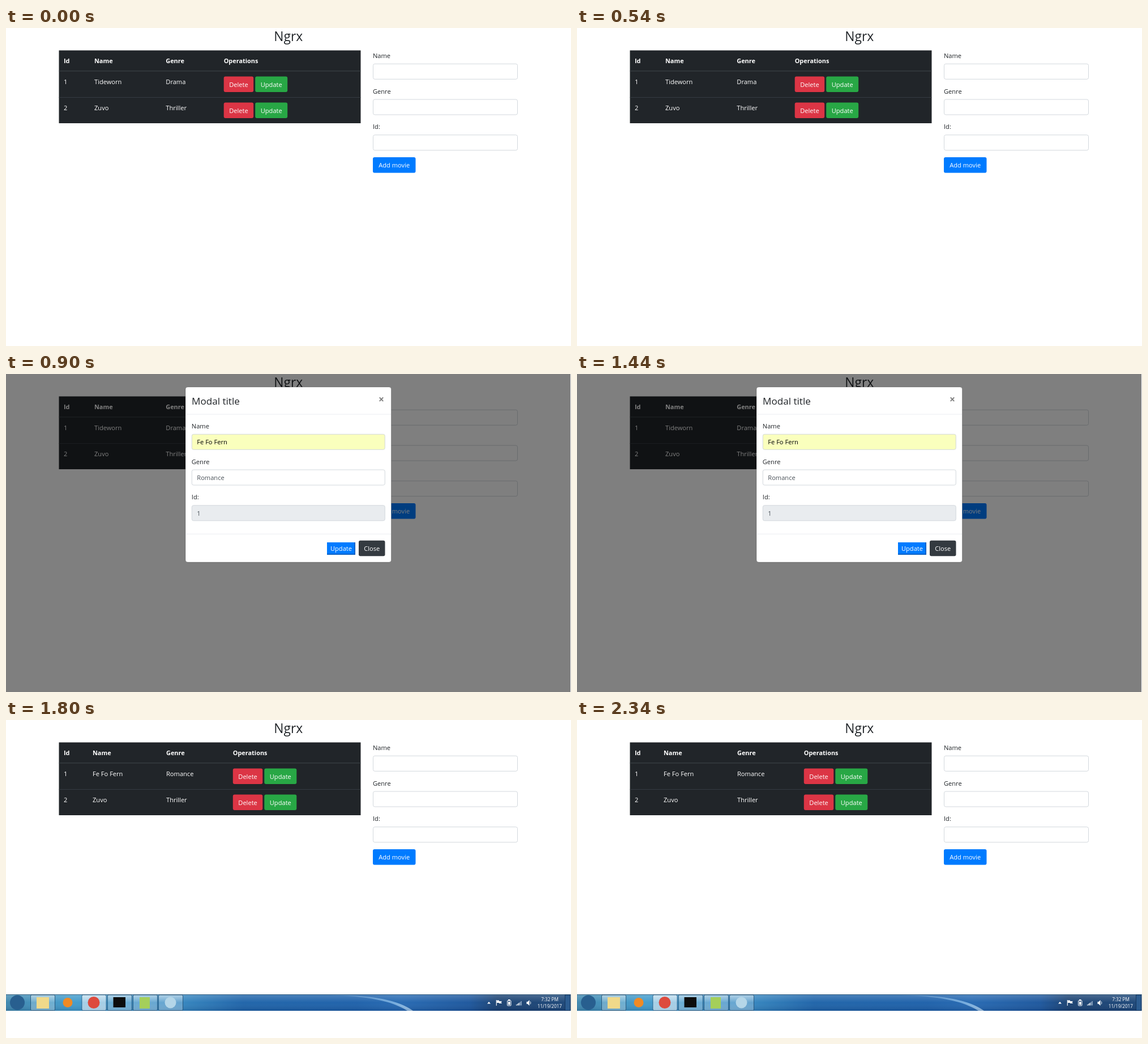
An HTML page for the animation above (2.7 s loop, 998 by 561 pixels).

```html
<!DOCTYPE html>
<html lang="en">
<head>
<meta charset="utf-8">
<title>Movie list</title>
<style>
  html, body { margin: 0; width: 100%; height: 100%; overflow: hidden; background: #fff; }
  svg { display: block; width: 998px; height: 561px; }
  text { font-family: "Open Sans", "Noto Sans", sans-serif; font-size: 11.1px; white-space: pre; }
</style>
</head>
<body>
<svg id="stage" viewBox="0 0 998 561" xmlns="http://www.w3.org/2000/svg">
  <defs>
    <linearGradient id="bar">
      <stop offset="0" stop-color="#3d86ad"/>
      <stop offset=".12" stop-color="#3f9acb"/>
      <stop offset=".3" stop-color="#3487c0"/>
      <stop offset=".42" stop-color="#1c62a8"/>
      <stop offset=".62" stop-color="#1b5fa9"/>
      <stop offset=".7" stop-color="#2367b1"/>
      <stop offset=".82" stop-color="#1a559c"/>
      <stop offset=".87" stop-color="#173f70"/>
      <stop offset="1" stop-color="#1a4577"/>
    </linearGradient>
    <linearGradient id="gloss" x2="0" y2="1">
      <stop offset="0" stop-color="#fff" stop-opacity=".22"/>
      <stop offset=".5" stop-color="#fff" stop-opacity=".03"/>
      <stop offset="1" stop-color="#002" stop-opacity=".14"/>
    </linearGradient>
    <linearGradient id="tile" x2="0" y2="1">
      <stop offset="0" stop-color="#fff" stop-opacity=".5"/>
      <stop offset=".5" stop-color="#fff" stop-opacity=".22"/>
      <stop offset="1" stop-color="#fff" stop-opacity=".3"/>
    </linearGradient>
    <linearGradient id="streak">
      <stop offset="0" stop-color="#9fd0f5" stop-opacity="0"/>
      <stop offset=".8" stop-color="#9fd0f5" stop-opacity=".65"/>
      <stop offset="1" stop-color="#c5e4fb" stop-opacity=".8"/>
    </linearGradient>
  </defs>
</svg>
<script>
const stage = document.getElementById('stage');
const HOLD = 900, LOOP = 2700;
const DARK = '#212529', GREY = '#495057', BLUE = '#007bff';

function add(parent, tag, attrs, content) {
  const el = document.createElementNS('http://www.w3.org/2000/svg', tag);
  for (const key in attrs) el.setAttribute(key, attrs[key]);
  if (content) el.textContent = content;
  parent.appendChild(el);
  return el;
}
const group = () => add(stage, 'g', {});
const box = (p, x, y, width, height, fill, more) =>
  add(p, 'rect', { x, y, width, height, fill, ...more });
const label = (p, x, y, content, fill = DARK, more) =>
  add(p, 'text', { x, y, fill, ...more }, content);
const path = (p, d, more) => add(p, 'path', { d, fill: 'none', ...more });
const middle = { 'text-anchor': 'middle' };

function button(p, x, y, w, content, fill) {
  box(p, x, y, w, 27.5, fill, { rx: 3 });
  label(p, x + w / 2, y + 18.2, content, '#fff', { ...middle, 'font-size': 11.2 });
}

function field(p, x, y, w, name, { value, fill = '#fff', ink = GREY } = {}) {
  label(p, x - .5, y - 10.5, name);
  box(p, x, y, w, 27, fill, { stroke: '#ced4da', 'stroke-width': .9, rx: 3 });
  if (value) label(p, x + 9, y + 18, value, ink);
}

function table(p, cols, rows) {
  box(p, 93.5, 39.5, 533, 128.5, DARK);
  box(p, 93.5, 75.4, 533, 1, '#40464b');
  box(p, 93.5, 122, 533, .9, '#383e44');
  ['Id', 'Name', 'Genre', 'Operations'].forEach((head, i) =>
    label(p, cols[i], 62.3, head, '#fff', { 'font-weight': 700, style: 'font-size:10.9px' }));
  rows.forEach((row, r) => {
    const y = 85.5 + r * 46;
    row.forEach((cell, i) => label(p, cols[i], y + 13.4, cell, '#fff'));
    button(p, cols[3], y, 52.5, 'Delete', '#dc3545');
    button(p, cols[3] + 55.5, y, 57, 'Update', '#28a745');
  });
}

function page(p) {
  label(p, 498.7, 23.4, 'Ngrx', DARK, { ...middle, 'font-weight': 500, style: 'font-size:22.8px' });
  ['Name', 'Genre', 'Id:'].forEach((name, i) => field(p, 648.5, 63.3 + i * 62.7, 255, name));
  button(p, 648, 228, 75.5, 'Add movie', BLUE);
}

function dialog(p) {
  box(p, 0, 0, 997, 561, '#000', { opacity: .5 });
  box(p, 317, 23, 363.5, 309, '#fff', { rx: 4, stroke: '#000', 'stroke-opacity': .3, 'stroke-width': .8 });
  label(p, 328, 54, 'Modal title', DARK, { 'font-weight': 500, style: 'font-size:17.1px' });
  label(p, 663, 50.8, '×', '#7f7f7f', { ...middle, 'font-weight': 700, style: 'font-size:17.5px' });
  box(p, 317.5, 70.6, 362.5, .9, '#e9ecef');
  box(p, 317.5, 281.8, 362.5, .9, '#e9ecef');
  field(p, 328.3, 106.3, 341, 'Name', { value: 'Fe Fo Fern', fill: '#faffbd', ink: '#000' });
  field(p, 328.3, 169, 341, 'Genre', { value: 'Romance' });
  field(p, 328.3, 231.8, 341, 'Id:', { value: '1', fill: '#e9ecef' });
  box(p, 567, 297, 50, 21.7, BLUE);
  path(p, 'M567 318H616.3V297', { stroke: '#0056b3', 'stroke-width': 1.4 });
  label(p, 592, 312.2, 'Update', '#fff', middle);
  button(p, 623, 293.7, 46.5, 'Close', '#343a40');
}

function tray(p) {
  const white = { fill: '#fff' };
  path(p, 'M850 500.5L853 497L856 500.5Z', white);
  path(p, 'M866.3 494V504', { stroke: '#fff', 'stroke-width': 1.1 });
  path(p, 'M867 494.5H871V496H876L874.5 498L876 500H871V499H867Z', white);
  box(p, 885.5, 495, 6.5, 9, 'none', { rx: 1, stroke: '#fff' });
  box(p, 887, 493, 3.5, 2, '#fff');
  box(p, 887, 497, 3.5, 5.5, '#fff');
  for (let i = 0; i < 5; i++)
    box(p, 901 + i * 2.1, 502 - i * 1.5, 1.4, 1.5 + i * 1.5, i < 3 ? '#fff' : '#9fb6cf');
  path(p, 'M919.5 497H921.5L924.5 494V504L921.5 501H919.5Z', white);
  path(p, 'M926 496.5Q928 499 926 501.5', { stroke: '#fff', 'stroke-width': .9 });
  label(p, 960.5, 495.6, '7:32 PM', '#fff', { ...middle, style: 'font-size:8.2px' });
  label(p, 960.3, 508.2, '11/19/2017', '#fff', { ...middle, style: 'font-size:8.1px' });
  box(p, 987.5, 485, 9, 27.5, '#2c5c90', { stroke: '#0f2f55', 'stroke-width': .8 });
}

function taskbar(p) {
  box(p, 0, 484, 997.5, 29, 'url(#bar)');
  path(p, 'M560 485C630 486 680 494 709 513H719C690 492 640 484.5 560 485Z', { fill: 'url(#streak)' });
  box(p, 0, 484, 997.5, 29, 'url(#gloss)');
  box(p, 0, 484, 997.5, .8, '#28506f');
  [43.5, 134, 179.3, 224.5, 269.5].forEach((x, i) =>
    box(p, x, 485, 43, 27.5, 'url(#tile)', {
      rx: 2, stroke: '#1d4a6e', 'stroke-width': .8,
      style: i === 1 ? 'filter:brightness(1.1)' : ''
    }));
  box(p, 134.5, 485.5, 42, 26.5, '#fff', { rx: 2, opacity: .38 });
  const dot = (cx, r, fill) => add(p, 'circle', { cx, cy: 498.5, r, fill });
  dot(20, 13, '#285f8f');
  box(p, 54, 489, 22, 20, '#f0d98a');
  dot(109, 8.5, '#f08a24');
  dot(155, 10.5, '#dd4b3e');
  box(p, 189.5, 489, 21.5, 18, '#0c0c0c');
  box(p, 236, 489, 18, 20, '#a5cf5a');
  dot(290.5, 10, '#b5d6e8');
  tray(p);
}

const before = group(), after = group(), common = group(), modal = group(), bar = group();
table(before, [102, 156, 282.3, 384.7],
  [['1', 'Tideworn', 'Drama'], ['2', 'Zuvo', 'Thriller']]);
table(after, [102, 153, 283, 400.8],
  [['1', 'Fe Fo Fern', 'Romance'], ['2', 'Zuvo', 'Thriller']]);
page(common);
dialog(modal);
taskbar(bar);

const show = (g, on) => g.setAttribute('display', on ? 'inline' : 'none');

function draw(ms) {
  const step = Math.floor((ms % LOOP) / HOLD);
  show(before, step < 2);
  show(modal, step === 1);
  show(after, step === 2);
  show(bar, step === 2);
}

const start = performance.now();
function tick() {
  draw(performance.now() - start);
  requestAnimationFrame(tick);
}
draw(0);
requestAnimationFrame(tick);
</script>
</body>
</html>
```
